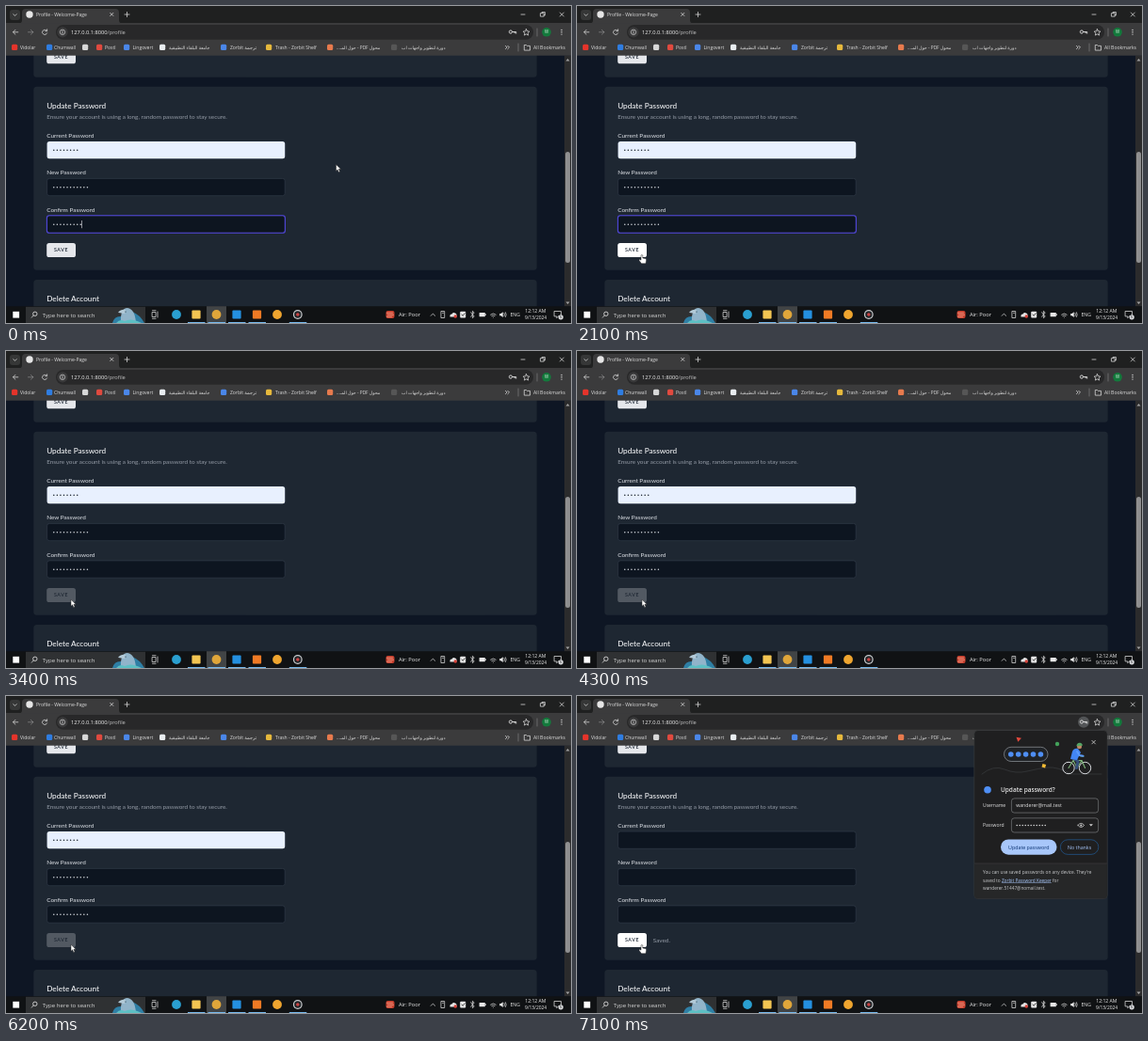
An HTML page that plays this animation: 600 px wide and 337 px high, repeating every 7.2 s.

```html
<!DOCTYPE html>
<html lang="en">
<head>
<meta charset="utf-8">
<title>Profile</title>
<style>
html, body { margin: 0; width: 100%; height: 100%; overflow: hidden; background: #0e1624; }
svg { display: block; width: 100vw; height: 100vh; }
text { white-space: pre; font-family: 'Open Sans', 'DejaVu Sans', sans-serif; }
.page text { font-family: Lato, sans-serif; }
.line { fill: none; stroke: #d4d4d4; stroke-width: .8; stroke-linecap: round; stroke-linejoin: round; }
</style>
</head>
<body>
<svg id="stage" viewBox="0 0 600 337" xmlns="http://www.w3.org/2000/svg"></svg>
<script>
const rect = (x, y, w, h, fill, r = 0, more = '') =>
  `<rect x="${x}" y="${y}" width="${w}" height="${h}" rx="${r}" fill="${fill}" ${more}/>`;
const disc = (x, y, r, fill, more = '') => `<circle cx="${x}" cy="${y}" r="${r}" fill="${fill}" ${more}/>`;
const text = (x, y, size, str, fill, more = '') =>
  `<text x="${x}" y="${y}" font-size="${size}" fill="${fill}" ${more}>${str}</text>`;
const line = (d, more = '') => `<path class="line" d="${d}" ${more}/>`;
const shape = (d, fill, more = '') => `<path d="${d}" fill="${fill}" ${more}/>`;
const group = (id, body, more = '') => `<g id="${id}" ${more}>${body}</g>`;
const rtl = s => '\u2067' + s + '\u2069';
const dots = (n, x, y, fill, step = 3.56, r = .78) =>
  Array.from({ length: n }, (_, i) => disc(x + i * step, y, r, fill)).join('');
const key = (x, y, c) => line(`M${x} ${y}h4v1.6M${x + 2.4} ${y}v1.3`, `style="stroke:${c};stroke-width:1"`) +
  disc(x - 1.8, y, 1.6, 'none', `stroke="${c}" stroke-width="1"`);

function browserTop() {
  const bar = '#3b3b3c', ink = '#dedede';
  const marks = [
    [9, '#e5342b', 15, 'Vidolar'], [46, '#2f7de1', 51, 'Chumwall'], [84, '#d8d8d8', 0, ''],
    [99, '#e04a3f', 105, 'Postl'], [128, '#4a86e8', 134.5, 'Lingovert'],
    [166, '#e8ecef', 173, rtl('جامعة البلقاء التطبيقية')], [231, '#4a86e8', 238, 'Zorbit ترجمة'],
    [279, '#e6b93c', 286, 'Trash - Zorbit Shelf'], [344, '#e77a4d', 351, rtl('محول PDF - حول المـ...')],
    [412, '#565656', 420, rtl('دورة لتطوير واجهات اب')]
  ];
  return rect(0, 0, 600, 18.5, '#1f2020') + rect(0, 18, 600, 34.7, bar) +
    rect(4, 4, 11, 11, '#363737', 3) + line('M7.8 8.7l1.7 1.7 1.7-1.7') +
    shape('M14 18.3q3 0 3-3V7q0-4 4-4h95q4 0 4 4v8.3q0 3 3 3z', bar) +
    disc(25, 9, 3.7, '#e6e6e6') + text(32, 11, 5.02, 'Profile - Welcome-Page', ink) +
    line('M110.7 7.3l3.2 3.2m0-3.2l-3.2 3.2M126 9h5m-2.5-2.5v5') +
    line('M547 9h4M567.8 7.7h3.4v3.4h-3.4zM569 7.7v-1.2h3.4v3.4h-1.2M588.3 7l4 4m0-4l-4 4') +
    line('M12.8 27.8H7.5m2.4-2.4l-2.4 2.4 2.4 2.4M43.2 26.2a2.6 2.6 0 1 0 .4 2.7M43.6 24.8v1.9h-1.9') +
    line('M23.5 27.8h5.3m-2.4-2.4l2.4 2.4-2.4 2.4', 'opacity=".45"') +
    rect(53, 20, 507, 15.8, '#282829', 7.9) +
    disc(60, 27.8, 5.6, '#3a3a3b') + disc(60, 27.8, 2.7, 'none', 'stroke="#d4d4d4" stroke-width=".7"') +
    line('M60 27.6v1.5M60 26.4v.05') +
    text(69, 29.9, 5.7, '127.0.0.1:8000<tspan fill="#c2c2c2">/profile</tspan>', '#f0f0f0') +
    group('keyGlow', disc(538, 27.8, 6, '#525456')) + key(537.7, 27.5, '#d4d4d4') +
    line('M552.5 24.6l1 2.2 2.4.3-1.8 1.6.5 2.4-2.1-1.2-2.1 1.2.5-2.4-1.8-1.6 2.4-.3z') +
    line('M564 24v8', 'opacity=".4"') +
    disc(574, 27.8, 4.8, '#137a3c') + text(574, 29.4, 4.4, 'W', '#e8f5ea', 'text-anchor="middle"') +
    dots(1, 590, 25.5, ink, 1, .7) + dots(1, 590, 27.8, ink, 1, .7) + dots(1, 590, 30.1, ink, 1, .7) +
    marks.map(([x, c, tx, s]) => rect(x - 3, 40.8, 6.2, 6.2, c, 1.5) +
      (s && text(tx, 45.9, s[0] === '\u2067' ? 4.75 : 5, s, ink))).join('') +
    line('M530.4 42.3l1.7 1.7-1.7 1.7m2.4-3.4l1.7 1.7-1.7 1.7') +
    line('M544 40v8', 'opacity=".4"') +
    line('M550.3 46.7v-5.2h2.2l.8.9h3.2v4.3z') + text(560, 45.9, 5.1, 'All Bookmarks', ink);
}

const field = (y, fill = '#0d1520') =>
  rect(43.6, y, 252.6, 18.3, fill, 2.5, 'stroke="#343f4c" stroke-width=".6"');
const label = (y, s) => text(43.2, y, 6.4, s, '#d1d5db', 'font-weight="500"');
const saveText = y => text(51, y, 5.3, 'SAVE', '#1f2937', 'font-weight="600" letter-spacing=".53"');

function page() {
  const card = '#1e2732', title = 'font-weight="500"';
  return rect(0, 52.7, 600, 267, '#0e1624') +
    rect(29.3, 40, 534.4, 35.8, card, 3.5) + rect(29.3, 85.8, 534.4, 195, card, 3.5) +
    rect(29.3, 291, 534.4, 40, card, 3.5) +
    rect(43.2, 46.3, 30.8, 15, '#e5e7eb', 2.6) + saveText(56) +
    text(43.2, 108.9, 8.2, 'Update Password', '#f3f4f6', title) +
    text(43.2, 120.3, 6.37, 'Ensure your account is using a long, random password to stay secure.', '#949ba6') +
    label(139.8, 'Current Password') + label(179.3, 'New Password') + label(218.7, 'Confirm Password') +
    field(144) + field(183.4) + field(222.9) +
    group('filled', rect(43.6, 144, 252.6, 18.3, '#e8f0fe', 2.5) +
      dots(8, 50.8, 153.2, '#1b2430') + dots(11, 50.8, 192.7, '#d1d5db') +
      group('confirm', dots(11, 50.8, 232.2, '#d1d5db'))) +
    group('focus', rect(43.4, 222.8, 253, 18.5, 'none', 2.6, 'stroke="#5046dc" stroke-width="1.1"')) +
    rect(0, 228, .6, 8.2, '#e5e7eb', 0, 'id="caret"') +
    group('save', rect(43.2, 252, 30.8, 15, '#fff', 2.6, 'id="saveBox"') + saveText(261.3)) +
    group('saved', text(80.8, 261.6, 6.37, 'Saved.', '#949ba6')) +
    text(43.2, 314.3, 8.2, 'Delete Account', '#f3f4f6', title) +
    rect(593, 52.7, 7, 267, '#2b2b2c') + rect(594, 155, 5, 118, '#8f8f90', 2.5) +
    shape('M596.5 56l2 2.6h-4z', '#a5a5a5') + shape('M596.5 317l2-2.6h-4z', '#a5a5a5');
}

function taskbar() {
  const ink = '#f0f0f0';
  const apps = [[181, '#2a9fd0', 1, 0], [202, '#f3c552', 0, 1], [223.5, '#e0a63a', 1, 1], [245, '#2490e0', 0, 1],
    [266.5, '#f07a24', 0, 1], [288, '#efa52f', 1, 0], [309.8, '#c9cccf', 1, 1]];
  const mid = 'text-anchor="middle"';
  return rect(0, 319.2, 600, 18, '#101214') + rect(7.3, 324.8, 6.8, 6.8, '#fff') +
    rect(21, 319.8, 127, 17.2, '#2f3133') +
    disc(30.8, 327.3, 2.2, 'none', 'stroke="#eee" stroke-width=".8"') + line('M29.2 329l-2 2.2') +
    text(38.8, 330.5, 6.1, 'Type here to search', '#d6d6d6') +
    shape('M113 337q2-8 10-7 3-7 11-5 8 3 13 12z', '#2f7fa5') +
    shape('M122 337q-1-16 7-16 8 1 9 16z', '#91b4ca') + shape('M119 326q3-4 8-3l-1 4z', '#b3cad8') +
    shape('M117 337q4-5 9-2 7-4 18 2z', '#5cc0c4') + disc(127, 325, .6, '#18303f') +
    line('M155.5 325.5h3.5v5h-3.5zM161 325v6M155.5 323.7h3.5M155.5 332.3h3.5') +
    rect(213, 319.2, 21, 18, '#414446') +
    apps.map(([x, c, round, open]) =>
      (round ? disc(x, 328, 4.9, c) : rect(x - 4.6, 323.6, 9.2, 8.8, c, 1)) +
      (open ? rect(x - 9, 336, 18.5, 1, '#76b9ed') : '')).join('') +
    disc(309.8, 328, 3.7, '#202427') + disc(309.8, 328, 1.8, '#c94343') +
    rect(403.5, 324, 9, 8, '#c9412f', 2) +
    line('M404.5 326.3h6m-5 2h6m-7 2h5', 'style="stroke:#f0a08c"') +
    text(417, 330.2, 5.7, 'Air: Poor', ink) +
    line('M451.2 329.3l2.2-2.2 2.2 2.2') +
    line('M462.3 324.5h3.4v7h-3.4zM463.5 326.3h1') +
    shape('M471.5 330.5q-.5-3 2-3 1-2.5 3.5-1 2 .5 1.5 4z', '#e6e6e6') + disc(477.2, 330, 1.7, '#d8433b') +
    rect(482.2, 324.8, 6, 6.6, '#e8e8e8', 1) + line('M484 328l1.2 1.3 2-2.6', 'style="stroke:#222"') +
    line('M493.6 325.7l3.6 4.4-1.8 1.6v-7.4l1.8 1.6-3.6 4.4') +
    rect(502.6, 325.9, 6.2, 4.4, '#e8e8e8', .5) + rect(508.8, 327.2, .9, 1.8, '#e8e8e8') +
    line('M514.6 328.1a4.2 4.2 0 0 1 5.6 0M515.8 329.5a2.5 2.5 0 0 1 3.2 0M517.4 331v.1') +
    shape('M524.2 327h1.5l2-1.8v5.8l-2-1.8h-1.5z', ink) + line('M529 326.5q1 1.6 0 3.2m1.5-4q1.5 2.4 0 4.8') +
    text(535.5, 330, 5.1, 'ENG', ink) +
    text(562.3, 326.2, 5.1, '12:12 AM', ink, mid) + text(562.5, 333.3, 4.9, '9/13/2024', ink, mid) +
    line('M582.5 324.5h7v5.4h-3l-1.8 1.8v-1.8h-2.2z') + disc(589.2, 330.8, 2.6, '#d8dadc') +
    text(589.2, 332.4, 4, '5', '#111', mid);
}

function cyclist() {
  const wheel = x => disc(x, 76.5, 6.2, 'none', 'stroke="#d9dce0" stroke-width="1"');
  return wheel(522) + wheel(539.5) +
    line('M522 76.5l5-8h9l3.5 8M527 68.5l4 8 5-8M535 64h3', 'style="stroke:#7fb67a;stroke-width:1.1"') +
    line('M526.5 66l5.5 3.5-1.5 7', 'style="stroke:#35507c;stroke-width:3"') +
    shape('M524 67l2-8q2-4 6-3l3 4-4 8z', '#4285f4') +
    line('M531 59l2.5 4 4 .7', 'style="stroke:#5b9af7;stroke-width:2"') +
    disc(533.5, 53.8, 2.5, '#b98765') + shape('M530.4 53.3q.3-3.8 3.6-3.6 2.8.4 2.8 3z', '#56a565');
}

function popup() {
  const ink = '#e3e3e3', blue = '#a8c7fa', mid = 'text-anchor="middle"';
  const box = y => rect(461.4, y, 92.2, 15.2, 'none', 3, 'stroke="#85888a" stroke-width=".6"');
  return rect(421.8, 36.5, 141.4, 179, '#1f1f20', 4, 'stroke="#3d3e40" stroke-width=".6"') +
    line('M430 83q12-10 24-5t24 2 22-4 25 7h32', 'style="stroke:#37393c"') +
    rect(453.5, 54.3, 46.5, 15.2, '#202327', 7.6, 'stroke="#85898e" stroke-width=".8"') +
    dots(5, 460.8, 62, '#4f8ff5', 7.9, 2.8) +
    shape('M466.5 43.8l5.5 1-3.7 4z', '#e3493d') + disc(510, 51, 2.2, '#43a25a') +
    shape('M494.5 72l3.6 1-1 3.6-3.6-1z', '#f2bb35') + cyclist() +
    line('M546.8 47.3l3.6 3.6m0-3.6l-3.6 3.6') +
    disc(436, 99.8, 3.8, '#4f8ff5') +
    text(450, 102.2, 6.5, 'Update password?', ink, 'font-weight="600"') +
    text(431, 118, 5, 'Username', ink) + box(108.9) + text(466.2, 118.2, 5.2, 'wanderer@mail.test', ink) +
    text(431, 139, 5, 'Password', ink) + box(129.8) + dots(11, 467.2, 137.4, ink, 3, .75) +
    line('M532 137.4q3.3-4.2 6.6 0-3.3 4.2-6.6 0z') + disc(535.3, 137.4, 1, '#d4d4d4') +
    shape('M543.9 136.3h4l-2 2.2z', '#d4d4d4') +
    rect(450, 152.5, 59.5, 16.2, blue, 8.1) +
    text(479.8, 162.5, 5.3, 'Update password', '#0b3270', mid + ' font-weight="500"') +
    rect(513.4, 152.8, 40.4, 15.6, 'none', 7.8, 'stroke="#215b96" stroke-width=".7"') +
    text(533.6, 162.5, 5.3, 'No thanks', blue, mid + ' font-weight="500"') +
    shape('M422.1 178h140.8v33.5q0 3.8-4 3.8h-132.8q-4 0-4-3.8z', '#262728') +
    rect(422.1, 177.7, 140.8, .6, '#3d3e40') +
    text(431, 188.7, 4.75, "You can use saved passwords on any device. They're", '#c9cbcd') +
    text(431, 197.5, 4.75, `saved to <tspan fill="${blue}" text-decoration="underline">Zorbit Password Keeper</tspan> for`, '#c9cbcd') +
    text(431, 206.2, 4.75, 'wanderer.51447@nomail.test.', '#c9cbcd');
}

const edge = 'stroke="#222" stroke-width=".5" stroke-linejoin="round"';
const arrow = shape('M0 0v7l1.6-1.5 1.2 2.7 1.3-.6-1.2-2.6h2.3z', '#fff', edge);
const hand = shape('M-1 .7q.9-1.2 1.8 0v3l3 .6q1 .4 .8 1.6l-.6 3.6h-4.6l-2.4-3.4q-.2-1.2 1-1l1 .8z', '#fff', edge);

const stage = document.getElementById('stage');
stage.innerHTML = group('page', page(), 'class="page"') + browserTop() + taskbar() +
  group('popup', popup()) + group('pointer', group('arrow', arrow) + group('hand', hand));

const el = id => document.getElementById(id);
const ids = ['keyGlow', 'filled', 'confirm', 'focus', 'caret', 'save', 'saveBox', 'saved', 'popup', 'pointer', 'arrow', 'hand'];
const ui = Object.fromEntries(ids.map(id => [id, el(id)]));
const show = (node, on) => node.setAttribute('display', on ? 'inline' : 'none');

const LOOP = 7200, STEP = 100;
const HOVER = 2000, PRESS = 2700, BUSY = 2800, DONE = 6700, ASK = 6900;
const path = [[0, 350.5, 168.5], [800, 350.5, 168.5], [1200, 333, 181], [HOVER, 69, 264.3]];

function pointerAt(t) {
  for (let i = 1; i < path.length; i++) {
    const [t0, x0, y0] = path[i - 1], [t1, x1, y1] = path[i];
    if (t < t1) {
      const p = (t - t0) / (t1 - t0), e = p * p * (3 - 2 * p);
      return [x0 + (x1 - x0) * e, y0 + (y1 - y0) * e];
    }
  }
  return path[path.length - 1].slice(1);
}

function render(now) {
  const t = Math.floor((now % LOOP) / STEP) * STEP;
  const typed = t < 200 ? 9 : t < 400 ? 10 : 11;
  const busy = t >= BUSY && t < DONE, done = t >= DONE, over = t >= HOVER && !busy;
  [...ui.confirm.children].forEach((c, i) => show(c, i < typed));
  show(ui.filled, !done);
  show(ui.focus, t < PRESS);
  show(ui.caret, t < PRESS && (t < 400 || Math.floor((t - 400) / 500) % 2 === 0));
  ui.caret.setAttribute('x', 48.2 + typed * 3.56);
  ui.saveBox.setAttribute('fill', t === PRESS ? '#d1d5db' : over ? '#fff' : '#e5e7eb');
  ui.save.setAttribute('opacity', busy ? (t === BUSY ? .5 : .26) : 1);
  show(ui.saved, done);
  show(ui.popup, t >= ASK);
  show(ui.keyGlow, t >= ASK);
  show(ui.hand, over);
  show(ui.arrow, !over);
  ui.pointer.setAttribute('transform', `matrix(1 0 0 1 ${pointerAt(t).join(' ')})`);
}

const start = performance.now();
function tick() {
  render(performance.now() - start);
  requestAnimationFrame(tick);
}
tick();
</script>
</body>
</html>
```
